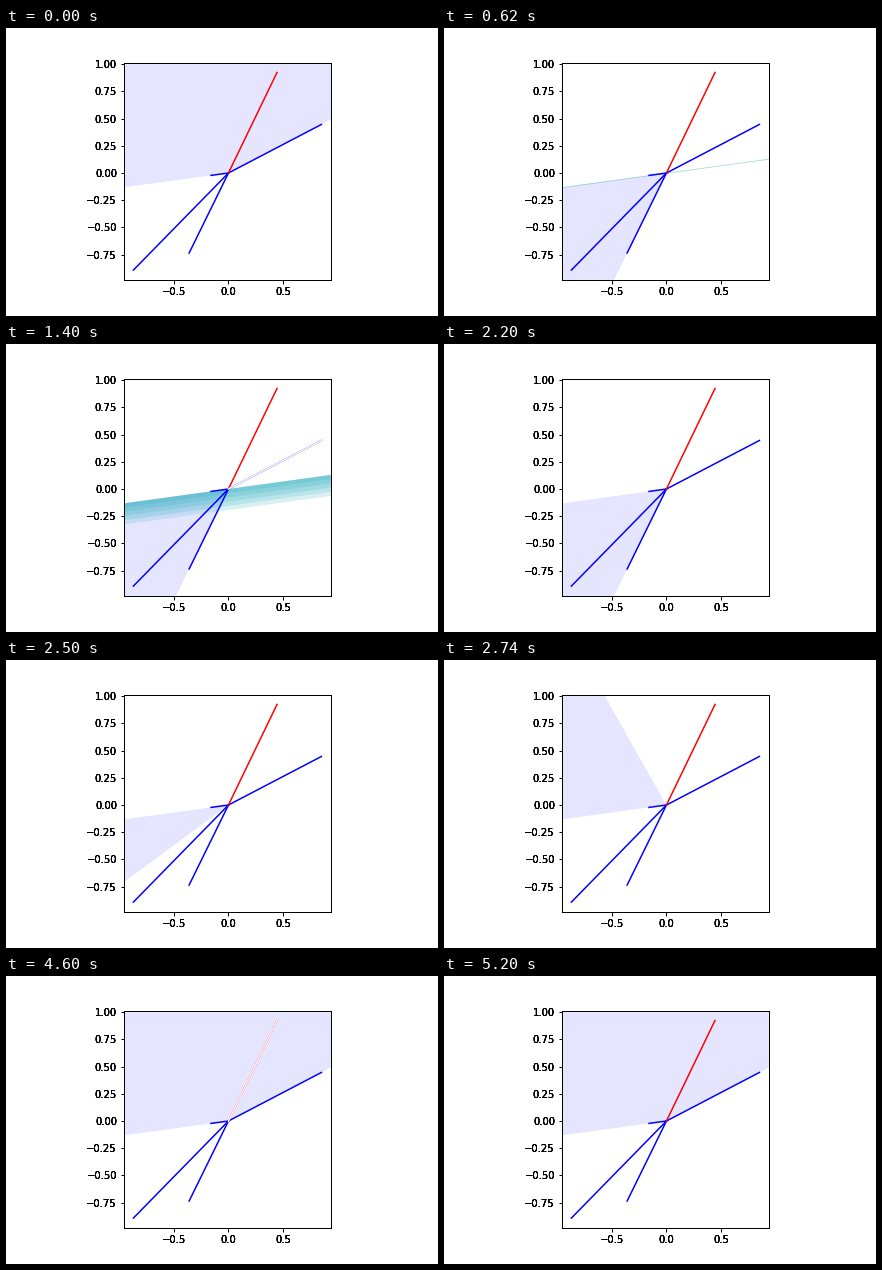
Write a matplotlib script that moves like this. It is 432 by 288 pixels and loops after 6.4 s.

```python
import matplotlib.pyplot as plt
import numpy as np
from matplotlib.animation import FuncAnimation
from matplotlib.patches import Polygon

STEP_MS, FRAMES = 20, 320
FAR = 20
BANDS = 5

FIRST = np.array([-0.160, -0.022])
SECOND = np.array([-0.361, -0.735])
THIRD = np.array([0.854, 0.446])
LAST = np.array([-0.873, -0.8916])
TARGET = np.array([0.446, 0.9234])


def unit(v):
    return v / np.hypot(*v)


START, END = unit(SECOND), unit(THIRD)
DETOUR = -(START + END) / 2  # swings the edge round the long way

fig = plt.figure(figsize=(6, 4), dpi=72, facecolor="white")
ax = fig.add_subplot()
fig.subplots_adjust(left=0.125, right=0.9, bottom=0.125, top=0.88)
ax.set_aspect("equal")


def ray(v, color, **kw):
    return ax.plot([0, v[0]], [0, v[1]], color=color, lw=1.5, **kw)[0]


for v in (FIRST, SECOND, THIRD, LAST):
    ray(v, "blue")
ray(TARGET, "red")
blinkers = [
    (70, ray(THIRD, "white", visible=False)),
    (230, ray(TARGET, "white", visible=False)),
]
ax.set(xlim=ax.get_xlim(), ylim=ax.get_ylim())

# Solid black frame; labels are overprinted to get their heavy look
ax.set_xticks([-0.5, 0, 0.5])
ax.set_yticks(np.arange(-0.75, 1.01, 0.25))
ax.tick_params(width=1, labelbottom=False, labelleft=False)
ax.spines[:].set_linewidth(1)


def heavy_label(text, xy, coords, offset, ha, va):
    for _ in range(4):
        ax.annotate(text.replace("-", "\u2212"), xy, xycoords=coords,
                    xytext=offset, textcoords="offset points", ha=ha, va=va)


for x in ax.get_xticks():
    heavy_label(f"{x:.1f}", (x, 0), ax.get_xaxis_transform(),
                (0, -7), "center", "top")
for y in ax.get_yticks():
    heavy_label(f"{y:.2f}", (0, y), ax.get_yaxis_transform(),
                (-7, 0), "right", "center_baseline")


def area(color, alpha):
    return ax.add_patch(Polygon(np.zeros((3, 2)), fc=color, alpha=alpha, lw=0))


cone = area("blue", 0.1)
bands = [area("#1eaabb", 0.17) for _ in range(BANDS)]


def cone_edge(n):
    if 1 <= n < 110:
        return START
    if 110 <= n <= 160:
        t = min(n - 110, 49) / 25
        if t < 1:
            return START + t * (DETOUR - START)
        return DETOUR + (t - 1) * (END - DETOUR)
    return END


def update(n):
    cone.set_xy([(0, 0), FAR * unit(FIRST), FAR * unit(cone_edge(n))])

    depth = 0.2 * min(n - 30, 29) / 30 if 30 < n < 110 else 0
    a, b = FAR * unit(FIRST), -FAR * unit(FIRST)
    for i, band in enumerate(bands, 1):
        drop = np.array([0, depth * i / BANDS])
        band.set_xy([a, b, b - drop, a - drop])
        band.set_visible(depth > 0)

    for begin, line in blinkers:
        k = n - begin
        line.set_visible(0 <= k < 40 and k // 10 % 2 == 0)
    return [cone, *bands, *(line for _, line in blinkers)]


anim = FuncAnimation(fig, update, frames=FRAMES, interval=STEP_MS,
                     init_func=lambda: update(0), repeat=True, repeat_delay=0)
plt.show()
```
